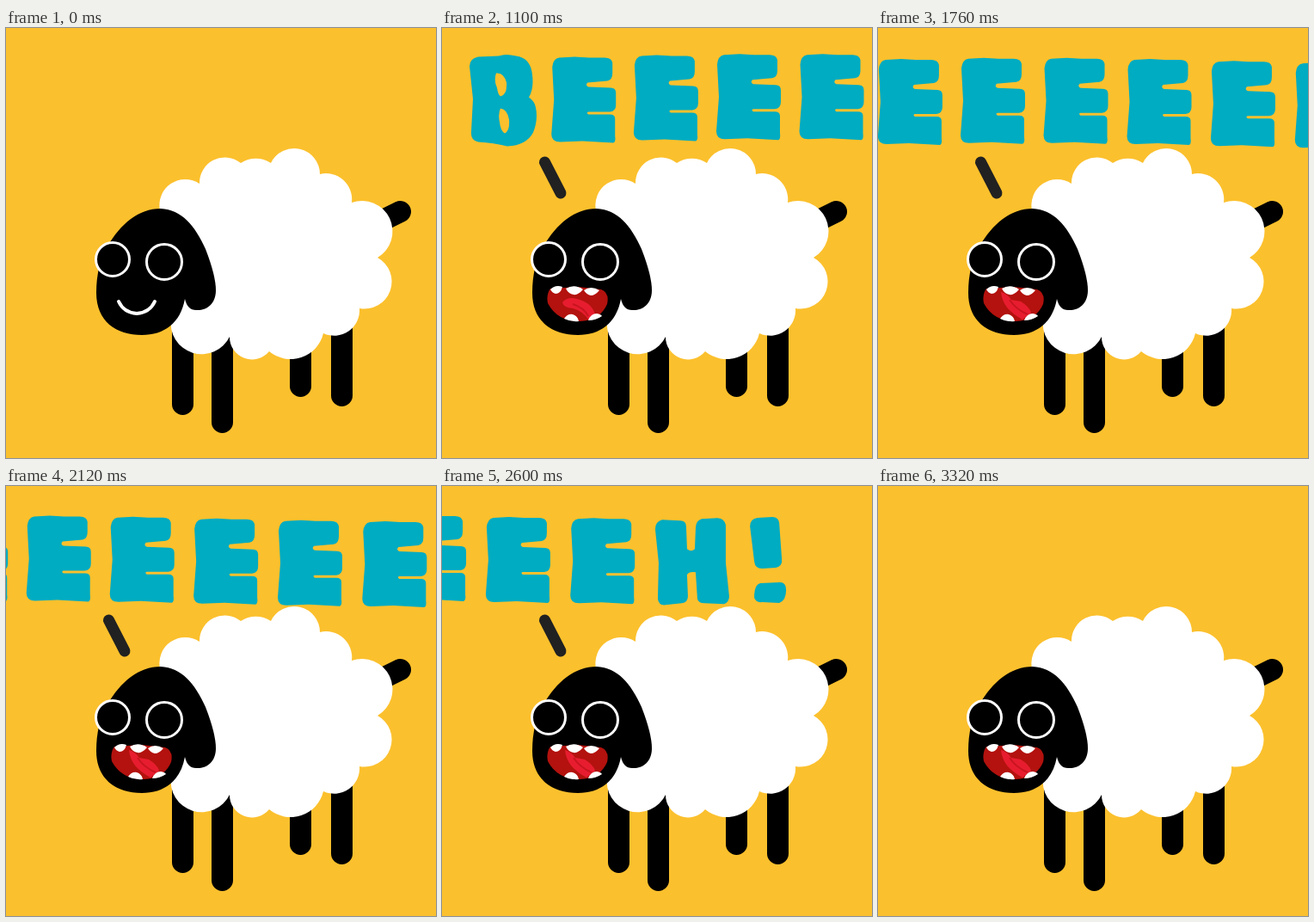
Animation, 500 px wide and 500 px high, one loop 3.38 s. Source, as an HTML page:

```html
<!DOCTYPE html>
<html lang="en">
<head>
<meta charset="utf-8">
<title>Sheep</title>
<style>
  html, body { margin: 0; width: 100%; height: 100%; overflow: hidden; background: #fbc02d; }
  svg { display: block; width: 100%; height: 100%; }
</style>
</head>
<body>
<svg viewBox="0 0 500 500">
  <defs>
    <path id="B" transform="translate(0 -5)" d="M10 3Q0 5 0 14L4 52L2 90Q1 100 10 102Q28 103 44 107Q66 106 74 91Q80 76 77 62Q76 55 69 50Q75 40 73 24Q71 4 54 2Q42 -1 34 2Z
      M31 22Q40 21 43 33Q44 47 36 49Q33 47 32 39Q28 30 31 22Z
      M36 63Q44 64 46 76Q47 89 41 92Q36 89 35 79Q33 69 36 63Z"/>
    <path id="E" d="M9 1Q2 2 1 12L3 50L0 90Q0 99 10 99L36 98L72 100Q75 99 74 92V72Q74 67 68 67L43 67Q40 65 43 64L68 64Q75 63 75 56V42Q75 36 69 36L43 35Q39 33 42 30L65 28Q71 27 71 19V7Q70 1 62 1L44 1L27 0Z"/>
    <path id="H" d="M8 2Q0 4 0 13L4 52L3 94Q4 102 12 101L31 99Q38 98 38 91L37 66Q39 62 47 63L49 94Q50 99 57 99L80 100Q86 98 86 91L82 52L82 8Q80 0 72 0L54 1Q47 3 47 12L46 36Q42 40 37 36L36 10Q36 3 29 3Z"/>
    <path id="bang" transform="translate(11 0)" d="M9 1Q0 2 0 11L5 52Q6 60 14 60L30 59Q38 57 37 49L34 7Q33 0 26 0Z
      M12 77Q6 78 5 90V94Q7 100 14 99L34 100Q42 97 42 85Q42 76 35 76Z"/>
    <clipPath id="lips"><path d="M126 303Q121 310 123 320Q134 341 160 341Q184 340 192 321Q195 308 185 304L158 301Z"/></clipPath>
  </defs>

  <rect width="500" height="500" fill="#fbc02d"/>
  <path d="M205.500 330V437.500M251.500 330V458.500M342.500 340V416.500M390.500 330V427.500M425 230L458.500 213.500"
    stroke="#000" stroke-width="25" stroke-linecap="round"/>
  <path fill="#fff" d="M179 212A30 30 0 0 1 225 181A29.500 29.500 0 0 1 273 157A32 32 0 0 1 308 157A30 30 0 0 1 365 170A30 30 0 0 1 402 203A35.500 35.500 0 0 1 432 267A31.700 31.700 0 0 1 411 326A29.500 29.500 0 0 1 369 355A39 39 0 0 1 306 376A26 26 0 0 1 260 359A36 36 0 0 1 192 338Z"/>
  <path d="M180 210C204 211 220 230 232 257Q244 288 244 305C244 322 232 329 221 328Q211 328 208 315C203 343 184 357 158 357C128 357 105 341 105 308Q105 276 118 254C133 228 154 210 180 210Z"/>
  <g stroke="#fff" stroke-width="3">
    <ellipse class="eye" cx="124" cy="269" rx="19.500" ry="19.500"/>
    <ellipse class="eye" cx="184" cy="272" rx="20.500" ry="20.500"/>
  </g>
  <path id="smile" d="M131 318Q137 331 152 332Q167 331 173 318" fill="none" stroke="#fff" stroke-width="4" stroke-linecap="round"/>
  <g id="mouth">
    <g clip-path="url(#lips)">
      <rect x="120" y="298" width="76" height="45" fill="#b3120e"/>
      <g id="flat">
        <path d="M140 319Q146 312 157 315Q174 319 178 333L171 340Q164 329 152 326Q141 325 140 319Z" fill="#e71d2f"/>
        <path d="M152 321Q165 325 170 335" fill="none" stroke="#c9141f" stroke-width="2"/>
      </g>
      <g id="tall">
        <path d="M143 307Q150 309 155 316L166 318Q176 324 178 331L168 339Q157 333 150 325Q144 317 143 307Z" fill="#e71d2f"/>
        <path d="M153 316Q160 327 174 333" fill="none" stroke="#c9141f" stroke-width="2"/>
      </g>
    </g>
    <path d="M126 304Q132 298 140 301Q138 309 132 309Q128 308 126 304ZM144 303Q154 297 164 304Q158 311 153 310Q147 309 144 303ZM165 305Q173 299 183 305Q178 311 173 311Q168 310 165 305ZM142 338Q146 332 152 333Q158 335 159 341Q150 342 142 338ZM170 340Q173 332 180 332Q185 333 186 335Q179 340 170 340Z" fill="#fff"/>
  </g>
  <g id="shout">
    <path d="M119.500 156L138 192" stroke="#212121" stroke-width="13" stroke-linecap="round"/>
    <g id="word" fill="#00acc1" fill-rule="evenodd"></g>
  </g>
</svg>
<script>
const LOOP = 3380, STEP = 60, SHOUT = 1100, WORD = 'BEEEEEEEEH!';
const $ = id => document.getElementById(id);
const show = (id, on) => $(id).setAttribute('visibility', on ? 'inherit' : 'hidden');

// Spacing widens slightly along the word while the letters ride one wave
[...WORD].forEach((char, i) => {
  const el = document.createElementNS('http://www.w3.org/2000/svg', 'use');
  el.setAttribute('href', '#' + (char === '!' ? 'bang' : char));
  el.setAttribute('x', 32 + 95 * i + 0.22 * i * i);
  el.setAttribute('y', 37.5 - 3.5 * Math.cos((i - 3.5) * Math.PI / 5));
  $('word').append(el);
});

const eyes = [...document.querySelectorAll('.eye')].map(el => ({
  el, y: el.cy.baseVal.value, r: el.ry.baseVal.value
}));

// The word speeds up, then levels off
const scroll = k => k * (14.4 + k * (0.58 - 0.0042 * k));
const bob = k => -1.5 + 2.5 * Math.cos((k - 13.5) * 0.22);

// Two blinks, each a squash and a stretch
function eyeScale(t) {
  const phase = Math.floor(t / STEP) % 5;
  if (t >= 600 || phase === 0) return 1;
  return phase === 1 ? 0.5 : phase === 2 ? 1.33 : 1;
}

function draw(t) {
  const k = Math.floor((t - SHOUT) / STEP);
  const open = k >= 0, s = eyeScale(t);
  for (const { el, y, r } of eyes) {
    el.setAttribute('cy', y + r * (1 - s));
    el.setAttribute('ry', r * s);
  }
  show('smile', !open);
  show('mouth', open);
  show('flat', open && k % 2 === 0);
  show('tall', open && k % 2 === 1);
  show('shout', open && k < 36);
  $('word').setAttribute('transform', `translate(${-scroll(k)} ${bob(k)})`);
}

let start;
function tick(now) {
  start ??= now;
  draw((now - start) % LOOP);
  requestAnimationFrame(tick);
}
draw(0);
requestAnimationFrame(tick);
</script>
</body>
</html>
```
